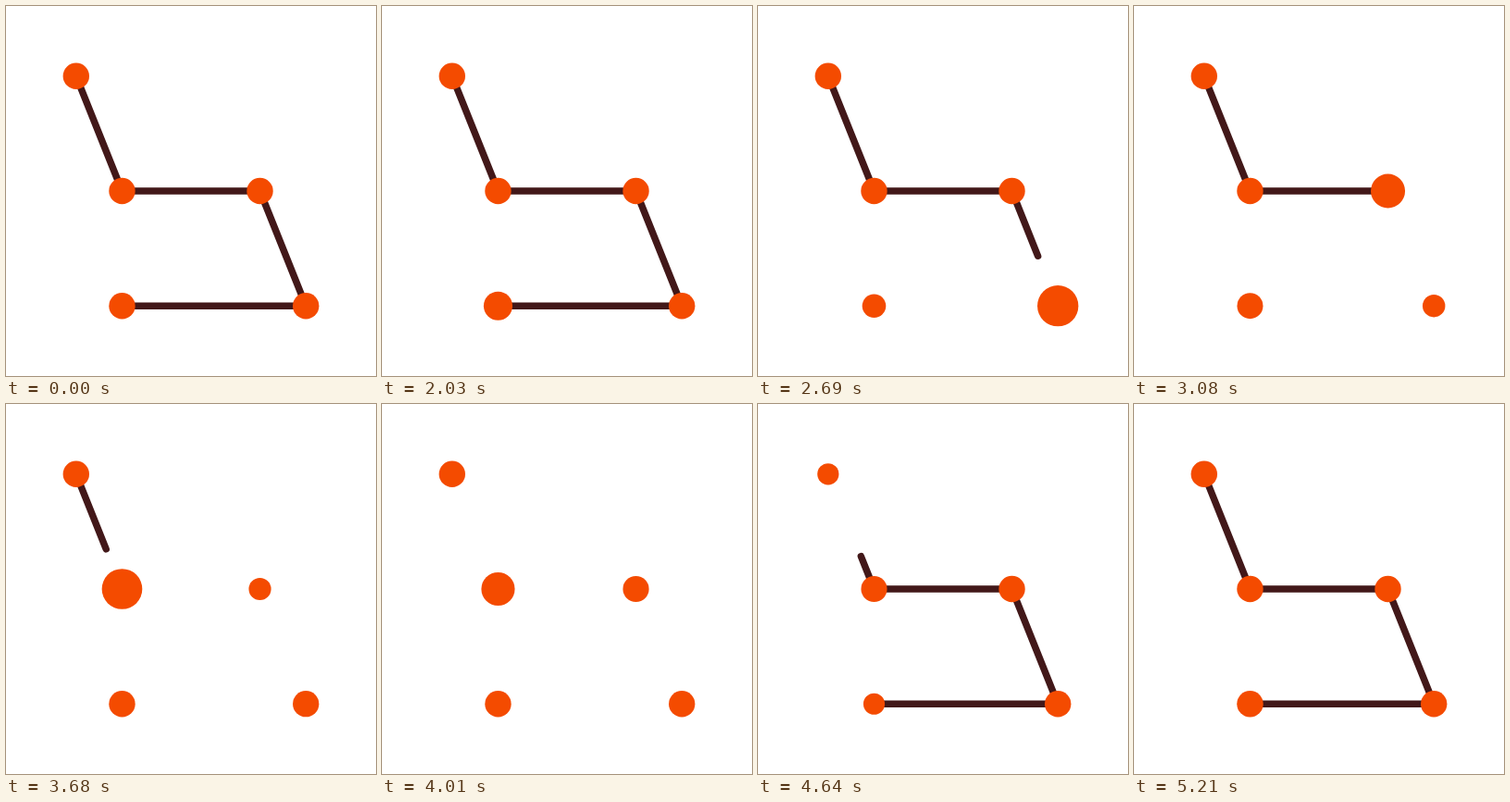
An HTML page with a canvas that plays this animation: 400x400 px, repeating every 5240 ms.

```html
<!DOCTYPE html>
<html lang="en">
<head>
<meta charset="utf-8">
<title>Constellation loop</title>
<style>
  html, body { margin: 0; width: 100%; height: 100%; overflow: hidden; background: #fff; }
  canvas { display: block; }
</style>
</head>
<body>
<canvas id="stage" width="400" height="400"></canvas>
<script>
const ctx = document.getElementById('stage').getContext('2d');
const LOOP = 5240, START = 2030, STEP = 30;
const UNIT = 24.84, RADIUS = 14.2, SWELL = 0.6;

const points = [[-3, 5], [5, 5], [3, 0], [-3, 0], [-5, -5]]
  .map(p => p.map(v => 200 + v * UNIT));
const lengths = points.slice(1).map((p, i) =>
  Math.hypot(p[0] - points[i][0], p[1] - points[i][1]));
const total = lengths.reduce((a, b) => a + b);

// Start of the latest pulse of each point; the first point pulses twice.
const pulses = [[2020, 4030], [2532], [3039], [3549], [4025]];
const ERASE = { start: 2037, every: 510, time: 500 };
const DRAW = { start: 4035, time: 945 };

const clamp = v => Math.min(1, Math.max(0, v));
const sineOut = v => Math.sin(clamp(v) * Math.PI / 2);
const expoOut = v => 1 - 2 ** (-10 * v);
const elasticOut = (v, period) =>
  1 + 2 ** (-10 * v) * Math.sin((v - period / 4) * 2 * Math.PI / period);

// Fast swell, then a springy return.
function pulse(t) {
  if (t < 0) return 0;
  if (t < 400) return expoOut(t / 400);
  const v = (t - 400) / 1250;
  return v < 1 ? 1 - elasticOut(v, 0.35) : 0;
}

function drawLine(from, to) {
  if (to - from < 0.1) return;
  ctx.setLineDash([to - from, 2 * total]);
  ctx.lineDashOffset = -from;
  ctx.beginPath();
  points.forEach(p => ctx.lineTo(...p));
  ctx.stroke();
}

function drawPoint([x, y], starts, t) {
  const begun = starts.filter(s => s <= t).pop();
  const scale = t < START ? 1 : 1 + SWELL * pulse(t - (begun ?? Infinity));
  ctx.beginPath();
  ctx.arc(x, y, RADIUS * scale, 0, 2 * Math.PI);
  ctx.fill();
}

function render(time) {
  const t = START + Math.floor((time % LOOP - START) / STEP) * STEP;
  ctx.fillStyle = '#fff';
  ctx.fillRect(0, 0, 400, 400);

  ctx.strokeStyle = '#421819';
  ctx.lineWidth = 7.45;
  ctx.lineCap = ctx.lineJoin = 'round';
  const erased = lengths.reduce((sum, len, i) =>
    sum + len * sineOut((t - ERASE.start - i * ERASE.every) / ERASE.time), 0);
  drawLine(erased, total);
  drawLine(0, total * sineOut((t - DRAW.start) / DRAW.time));

  ctx.fillStyle = '#f44b00';
  points.forEach((p, i) => drawPoint(p, pulses[i], t));
}

const origin = performance.now();
function tick() {
  render(performance.now() - origin);
  requestAnimationFrame(tick);
}
tick();
</script>
</body>
</html>
```
